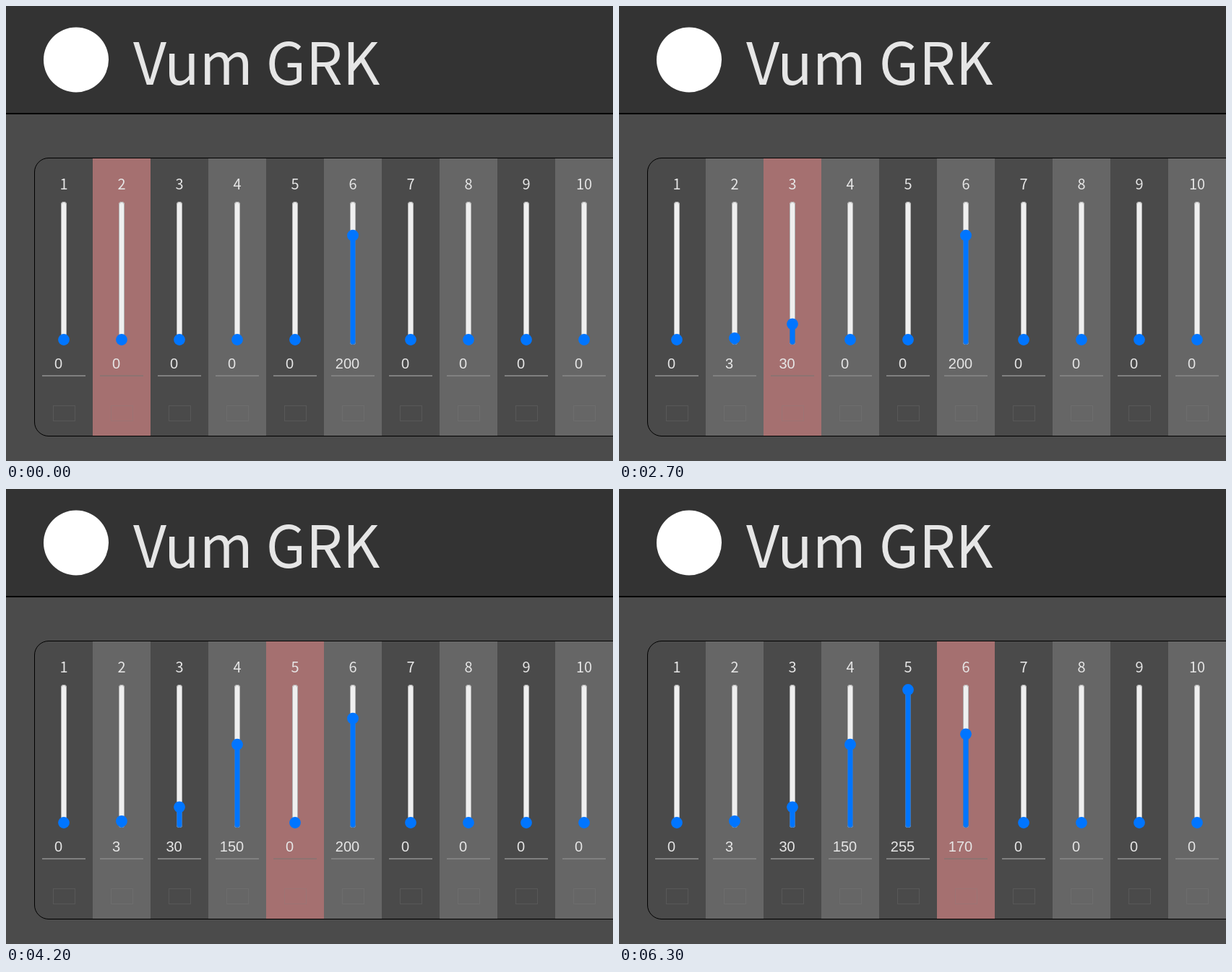
An HTML page that plays this animation: 840x630 px, repeating every 7 s.

```html
<!DOCTYPE html>
<html lang="en">
<head>
<meta charset="utf-8">
<title>Fader panel</title>
<style>
  html, body { margin: 0; width: 100%; height: 100%; overflow: hidden; background: #4b4b4b; }
  svg { display: block; }
  text { fill: #e6e6e6; }
  .sans { font-family: "Noto Sans CJK JP", "Noto Sans CJK SC", "Noto Sans CJK", "Noto Sans", sans-serif; }
  .label { font-size: 20px; text-anchor: middle; }
  .value { font: 20px "Liberation Sans", Arial, sans-serif; text-anchor: middle; }
  .track { fill: #efefef; }
  .edge { fill: none; stroke: #767676; stroke-opacity: .5; }
  .blue { fill: #0075ff; }
  .box { fill: none; stroke: #808080; stroke-opacity: .25; }
</style>
</head>
<body>
<svg id="stage" width="840" height="630" viewBox="0 0 840 630">
  <clipPath id="groove"><rect x="36" y="271" width="8" height="198" rx="4"/></clipPath>
  <rect width="840" height="148" fill="#333"/>
  <rect y="148" width="840" height="2"/>
  <circle cx="97" cy="74.5" r="45" fill="#fff"/>
  <text class="sans" x="176" y="109" font-size="80">Vum GRK</text>
  <rect x="39.5" y="210.5" width="900" height="385" rx="19.5" fill="#4a4a4a" stroke="#000"/>
</svg>
<script>
const LOOP = 7000, KEY_GAP = 200, BOTTOM = 469;
const stage = document.getElementById('stage');

// Each channel is selected at `focus`; from `press` on, a key adds `step` a few times.
const moves = {
  2: { focus: 0, press: 800, step: 1, times: 3 },
  3: { focus: 1600, press: 2100, step: 10, times: 3 },
  4: { focus: 2900, press: 3400, step: 50, times: 3 },
  5: { focus: 4200, press: 4700, step: 255, times: 1 },
  6: { focus: 5300, press: 5900, step: -10, times: 3, from: 200 }
};

function level(n, t) {
  const m = moves[n];
  if (!m) return 0;
  const presses = Math.floor((t - m.press) / KEY_GAP) + 1;
  return (m.from || 0) + m.step * Math.max(0, Math.min(m.times, presses));
}

function add(tag, attrs, parent) {
  const node = document.createElementNS('http://www.w3.org/2000/svg', tag);
  for (const key in attrs) node.setAttribute(key, attrs[key]);
  return parent.appendChild(node);
}

function makeChannel(n) {
  const g = add('g', { transform: `translate(${n * 80 - 40} 0)` }, stage);
  const back = add('rect', { y: 211, width: 80, height: 384 }, g);
  if (n === 1) back.setAttribute('visibility', 'hidden');
  add('text', { class: 'sans label', x: 40, y: 254 }, g).textContent = n;
  add('rect', { class: 'track', x: 36, y: 271, width: 8, height: 198, rx: 4 }, g);
  const fill = add('rect', { class: 'blue', x: 36, width: 8, 'clip-path': 'url(#groove)' }, g);
  add('rect', { class: 'edge', x: 36.5, y: 271.5, width: 7, height: 197, rx: 3.5 }, g);
  add('rect', { class: 'box', x: 25.5, y: 553.5, width: 30, height: 21 }, g);
  return {
    n, back, fill,
    knob: add('circle', { class: 'blue', cx: 40, r: 7.9 }, g),
    value: add('text', { class: 'value', x: 32.5, y: 502 }, g),
    line: add('rect', { x: 10, y: 511, width: 60, height: 2 }, g)
  };
}

const channels = Array.from({ length: 10 }, (_, i) => makeChannel(i + 1));

function draw(t) {
  const focus = Math.max(...Object.keys(moves).filter(n => moves[n].focus <= t));
  for (const { n, back, fill, knob, value, line } of channels) {
    const v = level(n, t), on = n === focus;
    const y = 462 - v / 255 * 184;
    back.setAttribute('fill', on ? '#a57070' : n % 2 ? '#4a4a4a' : '#666');
    fill.setAttribute('y', y);
    fill.setAttribute('height', BOTTOM - y);
    knob.setAttribute('cy', y);
    value.textContent = v;
    line.setAttribute('fill', on ? '#8d7371' : '#808080');
  }
}

const start = performance.now();
function tick() {
  draw((performance.now() - start) % LOOP);
  requestAnimationFrame(tick);
}
tick();
</script>
</body>
</html>
```
